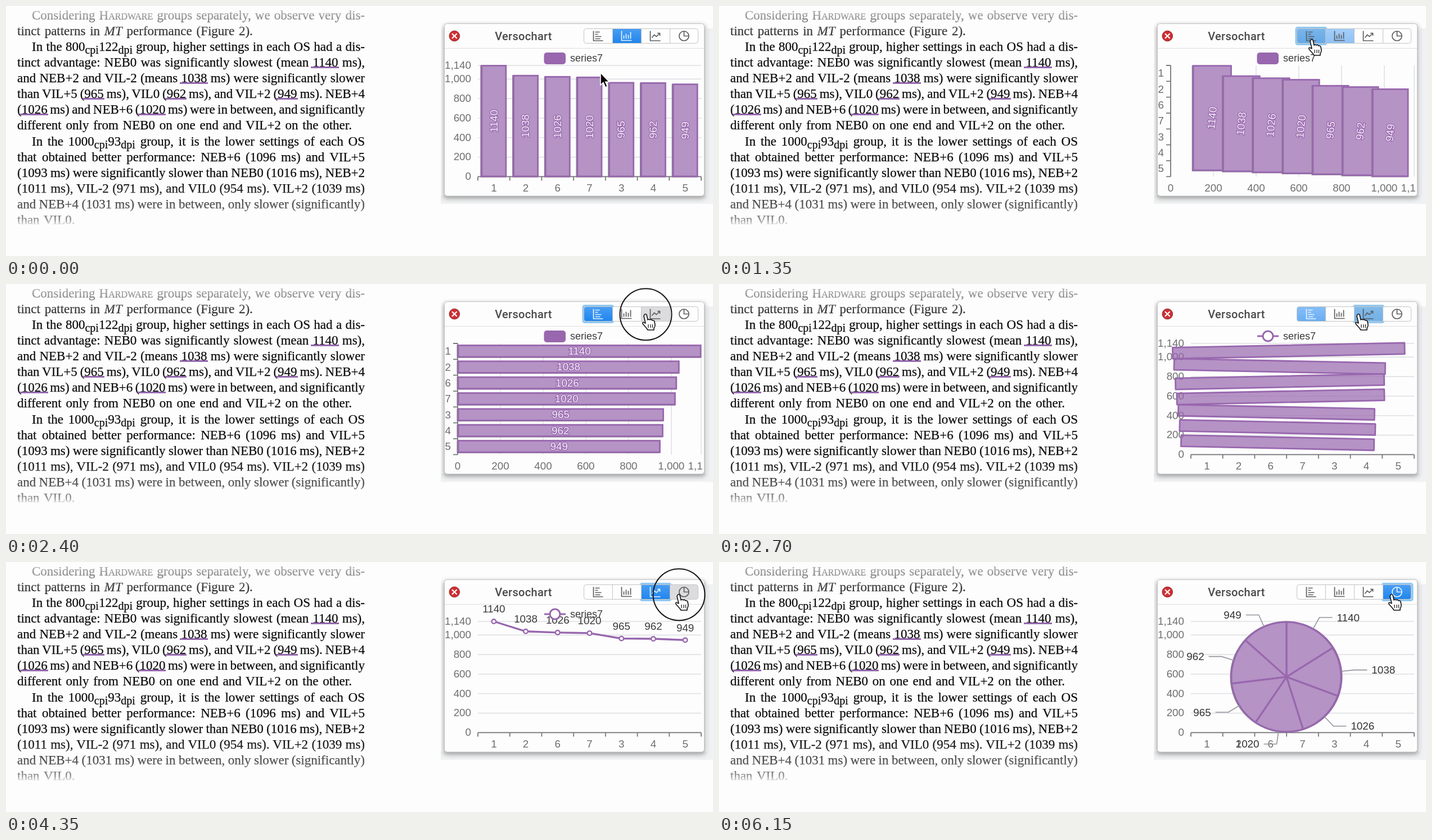
Recreate the animation shown at these times as an HTML page. Size 1257 px wide and 446 px high, loop 6.25 s.

```html
<!DOCTYPE html>
<html lang="en">
<head>
<meta charset="utf-8">
<title>Text to chart</title>
<style>
  html, body { margin: 0; width: 100%; height: 100%; overflow: hidden; background: #fdfdfd; }
  .page {
    position: absolute; left: 0; top: 0; width: 660px; height: 400px;
    -webkit-mask-image: linear-gradient(#0004, #0006 17px, #000c 45px, #000 66px, #000 318px, #000b 352px, #0009 372px, #0006 383px, #0001 391px);
    mask-image: linear-gradient(#0004, #0006 17px, #000c 45px, #000 66px, #000 318px, #000b 352px, #0009 372px, #0006 383px, #0001 391px);
  }
  .copy {
    position: absolute; left: 20px; top: 2.5px; width: 618px; color: #0c0c0c;
    font: 23px/28.15px "Liberation Serif", "Times New Roman", serif; -webkit-text-stroke: .25px;
  }
  .copy div { height: 28.15px; white-space: nowrap; text-align: justify; text-align-last: justify; word-spacing: -2px; }
  .copy .in { padding-left: 26px; }
  .copy .end { text-align-last: left; word-spacing: 2px; }
  .sc { font-variant: small-caps; }
  sub { font-size: 20px; line-height: 0; vertical-align: -4.5px; }
  u { position: relative; text-decoration: none; }
  u::after { content: ""; position: absolute; left: -3px; right: -1px; bottom: 2px; height: 3px; background: #9468ae; }
  svg { position: absolute; left: 0; top: 0; }
  svg text { font: 18.8px "Liberation Sans", Arial, sans-serif; }
  svg .title { font: 500 20px Roboto, sans-serif; letter-spacing: .3px; }
  svg .legend { font-size: 18px; }
</style>
</head>
<body>
<div class="page"><div class="copy">
  <div class="in">Considering <span class="sc">Hardware</span> groups separately, we observe very dis-</div>
  <div class="end">tinct patterns in <i>MT</i> performance (Figure 2).</div>
  <div class="in">In the 800<sub>cpi</sub>122<sub>dpi</sub> group, higher settings in each OS had a dis-</div>
  <div>tinct advantage: NEB0 was significantly slowest (mean <u>1140</u> ms),</div>
  <div>and NEB+2 and VIL-2 (means <u>1038</u> ms) were significantly slower</div>
  <div>than VIL+5 (<u>965</u> ms), VIL0 (<u>962</u> ms), and VIL+2 (<u>949</u> ms). NEB+4</div>
  <div>(<u>1026</u> ms) and NEB+6 (<u>1020</u> ms) were in between, and significantly</div>
  <div class="end">different only from NEB0 on one end and VIL+2 on the other.</div>
  <div class="in">In the 1000<sub>cpi</sub>93<sub>dpi</sub> group, it is the lower settings of each OS</div>
  <div>that obtained better performance: NEB+6 (1096 ms) and VIL+5</div>
  <div>(1093 ms) were significantly slower than NEB0 (1016 ms), NEB+2</div>
  <div>(1011 ms), VIL-2 (971 ms), and VIL0 (954 ms). VIL+2 (1039 ms)</div>
  <div>and NEB+4 (1031 ms) were in between, only slower (significantly)</div>
  <div class="end">than VIL0.</div>
</div></div>

<svg width="1257" height="446" viewBox="0 0 1257 446">
  <defs>
    <clipPath id="body"><rect x="780" y="75" width="459" height="263"/></clipPath>
    <clipPath id="halo"><rect x="773" y="26" width="484" height="327"/></clipPath>
    <clipPath id="tabs"><rect x="1027.5" y="40.5" width="203" height="26" rx="4"/></clipPath>
    <linearGradient id="blue" x2="0" y2="1"><stop stop-color="#4a9ff4"/><stop offset="1" stop-color="#1f84ec"/></linearGradient>
    <filter id="soft" x="-20%" y="-20%" width="140%" height="140%"><feGaussianBlur stdDeviation="4"/></filter>
  </defs>
  <g clip-path="url(#halo)">
    <rect x="773" y="338" width="484" height="15" fill="#f0f1f2"/>
    <rect x="1247" y="40" width="10" height="313" fill="#f0f1f4"/>
    <rect x="778" y="34" width="465" height="309" rx="5" fill="#000" opacity=".36" filter="url(#soft)"/>
  </g>
  <rect x="779.5" y="31.5" width="462" height="307.5" rx="5" fill="#fdfdfd" stroke="#c2c2c2"/>
  <path d="M780 75.5H1241" stroke="#dedede"/>
  <circle cx="797.3" cy="53.5" r="9.3" fill="#cf2f33" stroke="#8f2a2c"/>
  <path d="M793 49.2l8.6 8.6m0-8.6l-8.6 8.6" stroke="#fff" stroke-width="2.2"/>
  <text class="title" x="920" y="61" text-anchor="middle" fill="#4a4a4a">Versochart</text>
  <g id="scene"></g>
</svg>

<script>
const LOOP = 6250, STEP = 150;
const PURPLE = "#9867ae", FILL = 'fill="#9867ae" fill-opacity=".7"';
const values = [1140, 1038, 1026, 1020, 965, 962, 949];
const names = [1, 2, 6, 7, 3, 4, 5];
const marks = [0, 200, 400, 600, 800, 1000, 1140];
const CLICKS = { row: 1250, line: 2600, pie: 4450 };
const LEFT = 839, RIGHT = 1236, TOP = 106, BASE = 304.4, ROW_X = 803;
const bandW = (RIGHT - LEFT) / 7, bandH = (BASE - TOP) / 7;

const clamp = x => Math.max(0, Math.min(1, x));
const lerp = (a, b, p) => a + (b - a) * p;
const span = (t, start, length) => clamp((t - start) / length);
const ease = x => x < .5 ? 4 * x ** 3 : 1 - (2 - 2 * x) ** 3 / 2;
const each = (list, fn) => list.map(fn).join("");
const text = (x, y, s, anchor = "middle", extra = 'fill="#6e6e6e"') =>
  `<text x="${x}" y="${y + 6.6}" text-anchor="${anchor}" ${extra}>${s}</text>`;
const path = (d, stroke, width = 1, extra = 'fill="none"') =>
  `<path d="${d}" stroke="${stroke}" stroke-width="${width}" ${extra}/>`;
const comma = n => n.toLocaleString("en-US");

const colX = i => LEFT + bandW * (i + .5);
const valY = v => lerp(BASE, TOP, v / 1140);
const valX = v => lerp(ROW_X, RIGHT, v / 1140);
const rowY = i => TOP + bandH * (i + .5) - .4;
// Boxes are [centre x, centre y, width, height].
const column = (v, i) => [colX(i), (valY(v) + BASE) / 2, 43, BASE - valY(v) - 1];
const row = (v, i) => [(ROW_X + valX(v)) / 2, rowY(i), valX(v) - ROW_X - 2, 20.5];
const blend = (a, b, p) => a.map((n, k) => lerp(n, b[k], p));

function upright() {
  const ticks = [0, 1, 2, 3, 4, 5, 6, 7];
  return each(marks, m => path(`M${LEFT} ${valY(m)}H${RIGHT}`, "#e0e1e6", 1.6) +
      text(827, valY(m) - .7, comma(m), "end")) +
    path(`M${LEFT} ${BASE}H${RIGHT}` + each(ticks, i => `M${LEFT + bandW * i} ${BASE}v7`), "#77777c", 1.8) +
    each(names, (n, i) => text(colX(i), 324.8, n));
}

function sideways() {
  const ticks = [0, 1, 2, 3, 4, 5, 6, 7];
  return each(marks, m => path(`M${valX(m)} ${TOP}V${BASE}`, "#e0e1e6", 1.6) +
      text(valX(m), 324.8, comma(m))) +
    path(`M${ROW_X} ${TOP}V${BASE}` + each(ticks, i => `M${ROW_X} ${TOP + bandH * i}h-8`), "#77777c", 1.8) +
    each(names, (n, i) => text(791, rowY(i), n, "end"));
}

function box([x, y, w, h], turn = 0, radius = 0, edge = false) {
  const shape = `x="${x - w / 2}" y="${y - h / 2}" width="${w}" height="${h}" rx="${radius}"`;
  return (edge ? `<rect ${shape} transform="translate(-1.2 .5)" fill="none" stroke="#85808a" stroke-width="2.6"/>` +
                 `<rect ${shape} fill="#fdfdfd"/>` : "") +
    `<rect ${shape} transform="rotate(${turn} ${x} ${y})" ${FILL} stroke="${PURPLE}" stroke-width="2.8"/>`;
}

function bars(p) {
  return each(values, (v, i) => {
    const b = blend(column(v, i), row(v, i), p);
    return box(b, 0, 0, true) + `<g transform="rotate(${-90 * (1 - p)} ${b[0]} ${b[1]})">` +
      text(b[0], b[1] - .4, v, "middle", `fill="#f4eef7" stroke="${PURPLE}" stroke-width="2.6" paint-order="stroke"`) + "</g>";
  });
}

function shrinkingBars(p) {
  return each(values, (v, i) => {
    const turn = [-1, 1, -1, -1, 1, 1, 1][i] * 27;
    return box(blend(row(v, i), [colX(i), valY(v), 8, 8], p), turn * p, 4 * p);
  });
}

function line(labels) {
  const points = values.map((v, i) => `${colX(i)} ${valY(v)}`);
  return path("M" + points.join("L"), PURPLE, 3.4) +
    each(values, (v, i) => `<circle cx="${colX(i)}" cy="${valY(v)}" r="3.8" fill="#fff" stroke="${PURPLE}" stroke-width="2.4"/>`) +
    `<g opacity="${labels}">` + each(values, (v, i) => text(colX(i), valY(v) - 22.3, v, "middle", 'fill="#3b3b3b"')) + "</g>";
}

function pie(p, labels) {
  const cx = 1009, cy = 205, R = 98, N = 24, total = values.reduce((a, b) => a + b);
  const at = (a, r) => [cx + r * Math.sin(a), cy - r * Math.cos(a)];
  let from = 0, slices = "", notes = "";
  values.forEach((v, i) => {
    const sweep = v / total * 2 * Math.PI, mid = from + sweep / 2, pts = [];
    for (let k = 0; k <= N; k++) {
      const a = mid + Math.PI + (k + .5) / (N + 1) * 2 * Math.PI;
      const dot = [colX(i) + 4 * Math.sin(a), valY(v) - 4 * Math.cos(a)];
      pts.push(blend(dot, at(from + sweep * k / N, R), p));
    }
    const tail = [colX(i) - 4 * Math.sin(mid), valY(v) + 4 * Math.cos(mid)];
    pts.push(blend(tail, [cx, cy], p));
    slices += path("M" + pts.map(q => q.join(" ")).join("L") + "Z", PURPLE, 3, FILL + ' stroke-linejoin="round"');
    const side = Math.sin(mid) > 0 ? 1 : -1, [ex, ey] = at(mid, R), [ox, oy] = at(mid, 121);
    const reach = labels * 46, out = Math.min(1, reach / 23), flat = Math.max(0, reach - 23);
    notes += path(`M${ex} ${ey}L${lerp(ex, ox, out)} ${lerp(ey, oy, out)}h${side * flat}`, "#96939b", 1.6) +
      text(ox + side * 31, oy, v, side > 0 ? "start" : "end", 'fill="#333"');
    from += sweep;
  });
  const rim = p === 1 ? `<circle cx="${cx - 1}" cy="${cy}" r="${R}" fill="#fdfdfd" stroke="#85808a" stroke-width="3"/>` : "";
  return rim + slices + `<g opacity="${labels}">${notes}</g>`;
}

function legend(kind) {
  const key = kind === "line"
    ? path("M957 93H995", PURPLE, 3) + `<circle cx="976" cy="93" r="9" fill="#fff" stroke="${PURPLE}" stroke-width="3"/>`
    : `<rect x="956.5" y="83" width="38.5" height="21" rx="5" fill="${PURPLE}"/>`;
  return key + text(1003, 92.4, "series7", "start", 'class="legend" fill="#3b3b3b"');
}

const icons = [
  "M-7-9V8.5H10M-4-7H4M-4-3H1M-4 1H7M-4 5H5",
  "M-9-9V8H9M-5-1V5M-1-4V5M3-2V5M7-7V5",
  "M-9-9V8.5H9M-6 3L-2-2L2 1L8-5M3.5-5H8V-.5",
  "M0-8.5A8.5 8.5 0 1 1-.1-8.5M0-8.5V0H8.5"
];

function tabs(t) {
  const level = k => [
    span(t, CLICKS.row, 200) * (1 - span(t, 2620, 240)),
    1 - span(t, CLICKS.row, 200),
    span(t, 2620, 200) * (1 - span(t, CLICKS.pie, 200)),
    span(t, CLICKS.pie, 200)
  ][k];
  const focus = t < CLICKS.row ? -1 : t < CLICKS.line ? 0 : t < CLICKS.pie ? 2 : 3;
  const pressed = t >= 1200 && t < 1350 ? 0 : t >= 2400 && t < 2550 ? 2 : t >= 4200 && t < 4450 ? 3 : -1;
  const x = k => 1027.5 + 51 * k;
  return (focus < 0 ? "" : `<rect x="${x(focus) - 1.5}" y="38.5" width="54" height="30" rx="3" fill="#b4d9f0" stroke="#91c8ef" stroke-width="3"/>`) +
    '<g clip-path="url(#tabs)">' + each(icons, (d, k) => {
      const base = k === pressed ? "#dcdcde" : k === focus ? "#a9cde2" : "#fefefe";
      const rect = `<rect x="${x(k)}" y="40" width="51" height="27"`;
      return `${rect} fill="${base}"/>${rect} fill="url(#blue)" opacity="${level(k)}"/>`;
    }) + "</g>" +
    '<rect x="1027.5" y="40.5" width="203" height="26" rx="4" fill="none" stroke="#c4c4c6"/>' +
    path("M1078.5 41V66M1129.5 41V66M1180.5 41V66", "#c4c4c6") +
    each(icons, (d, k) => `<g transform="translate(${x(k) + 25 - (k === 0 ? 1 : 0)} 53.5)">` +
      path(d, level(k) > .5 ? "#e8f3ff" : "#5d5d61", 1.7) + "</g>");
}

const route = [[450, 1057, 119], [900, 1052, 67], [1200, 1054, 60], [1950, 1054, 60],
  [2400, 1137, 54], [3600, 1137, 54], [4200, 1196, 58], [LOOP, 1196, 58]];

function pointer(t) {
  const k = route.findIndex(stop => t <= stop[0]);
  const a = route[Math.max(0, k - 1)], b = route[k];
  const p = ease(span(t, a[0], b[0] - a[0] || 1));
  const x = lerp(a[1], b[1], p), y = lerp(a[2], b[2], p);
  const clicking = [1200, 2400, 4350].some(c => t >= c && t < c + STEP);
  const hand = "M-2 1Q0-2 2 1L4 10Q6 8 8 10Q10 8 12 11Q15 10 16 13L17 19Q17 22 15 25V28H4L2 25L-5 17Q-6 13-2 15L0 16L-3 3Z";
  const shape = y < 70
    ? path(hand, "#111", 1.6, 'fill="#fff" stroke-linejoin="round"') + path("M5 18V24M9 18V24M12.5 18V24", "#222", 1.3)
    : path("M0 0V22L5 17.5L8.7 26L12.4 24.4L8.8 16.2H15.4Z", "#fff", 1.6, 'fill="#050505"');
  return (clicking ? `<circle cx="${x + .5}" cy="${y + .3}" r="46" fill="none" stroke="#151515" stroke-width="2"/>` : "") +
    `<g transform="translate(${x} ${y})">${shape}</g>`;
}

function chart(t) {
  if (t < CLICKS.line) {
    const p = ease(span(t, CLICKS.row, 400));
    return (p > 0 ? sideways() : upright()) + bars(p) + legend("bar");
  }
  if (t < CLICKS.pie) {
    const p = ease(span(t, CLICKS.line, 450));
    return upright() + (p < 1 ? shrinkingBars(p) : line(span(t, 3000, 250))) + legend("line");
  }
  return upright() + pie(ease(span(t, CLICKS.pie, 440)), span(t, 4885, 180));
}

const scene = document.getElementById("scene");
let shown = -1;
function draw(now) {
  const t = now % LOOP, held = t < 450 ? 0 : Math.floor(t / STEP) * STEP;
  if (held !== shown) {
    shown = held;
    scene.innerHTML = tabs(held) + `<g clip-path="url(#body)">${chart(held)}</g>` + pointer(held);
  }
}
const start = performance.now();
function tick() {
  draw(performance.now() - start);
  requestAnimationFrame(tick);
}
tick();
</script>
</body>
</html>
```
